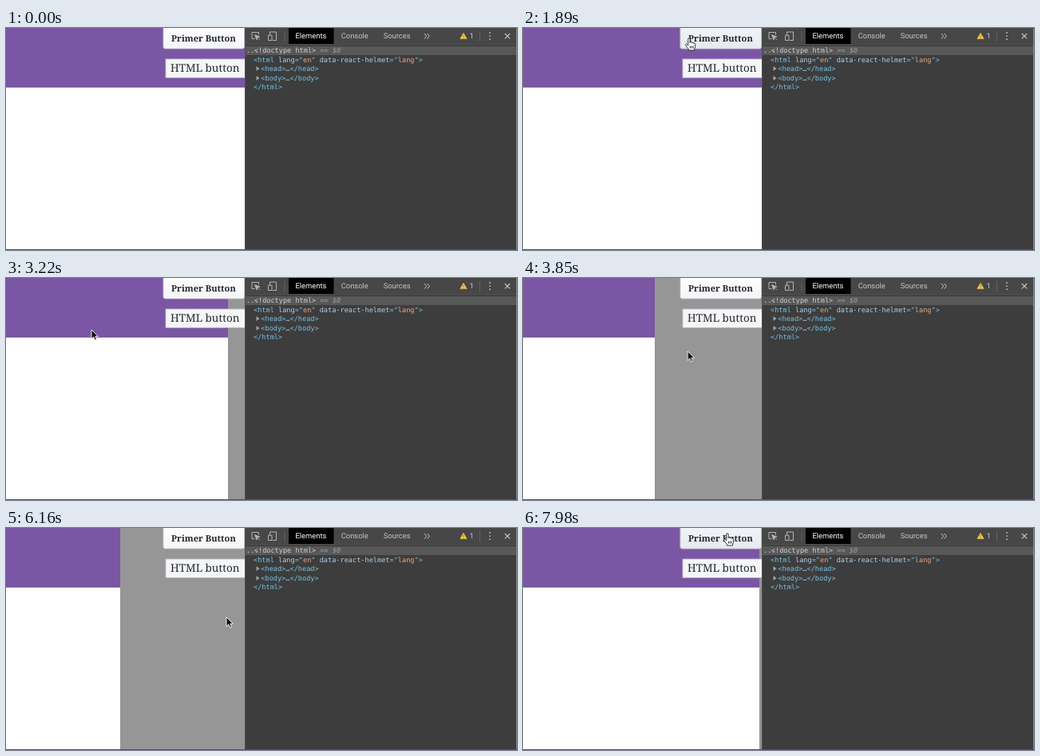
These frames come from a looping animation (640 by 279 pixels, 8 s). An HTML page:

```html
<!DOCTYPE html>
<html lang="en">
<head>
<meta charset="utf-8">
<title>Page and inspector</title>
<style>
  html, body { margin: 0; width: 100%; height: 100%; overflow: hidden; background: #fff; }
  svg { display: block; width: 100vw; height: 100vh; }
  text { white-space: pre; text-rendering: geometricPrecision; }

  .serif { font-family: "Noto Serif", serif; fill: #24292e; }
  .tabs { font: 9.4px Roboto, sans-serif; fill: #c4c4c4; }
  .tabs .active { fill: #fff; }
  .code { font: 8.59px "DejaVu Sans Mono", monospace; fill: #74c3e8; }
  .attr { fill: #b0d0ea; }
  .value { fill: #f0a880; }
  .muted { fill: #d0d0d0; }
  .faint { fill: #a0a0a0; }
  .icon { fill: none; stroke: #b4b4b4; stroke-width: 1; }

  .page, .cursor, .arrow, .hand, .hover { animation: 8s linear infinite; }
  .page { animation-name: slide; }
  .cursor { animation-name: travel; }
  .arrow { animation-name: arrow; }
  .hand, .hover { animation-name: over; }
  .arrow, .hand, .hover { animation-timing-function: step-end; }

  @keyframes slide {
    0%, 38.65% { transform: translateX(0); animation-timing-function: cubic-bezier(.33, .33, .6, 1); }
    52.5% { transform: translateX(-156px); }
    86% { transform: translateX(-156px); animation-timing-function: cubic-bezier(.33, .33, .6, 1); }
    100% { transform: translateX(-2.8px); }
  }
  @keyframes travel {
    0%, 4% { transform: translate(-14px, 205px); animation-timing-function: ease-in-out; }
    13% { transform: translate(208px, 13px); }
    32% { transform: translate(208px, 13px); animation-timing-function: ease-in-out; }
    39% { transform: translate(107px, 65px); }
    42% { transform: translate(107px, 65px); animation-timing-function: ease-in-out; }
    55.5% { transform: translate(342px, 129px); }
    73.4% { transform: translate(342px, 129px); animation-timing-function: ease-in-out; }
    77% { transform: translate(276px, 112px); }
    78.8% { transform: translate(276px, 112px); animation-timing-function: ease-in-out; }
    84%, 100% { transform: translate(256px, 7px); }
  }
  @keyframes over {
    0% { opacity: 0; }
    12.2% { opacity: 1; }
    33.2% { opacity: 0; }
    83%, 100% { opacity: 1; }
  }
  @keyframes arrow {
    0% { opacity: 1; }
    12.2% { opacity: 0; }
    33.2% { opacity: 1; }
    83%, 100% { opacity: 0; }
  }
</style>
</head>
<body>
<svg viewBox="0 0 640 279" preserveAspectRatio="none">
  <defs>
    <linearGradient id="face" x2="0" y2="1">
      <stop stop-color="#fefefe"/><stop offset="1" stop-color="#f4f5f8"/>
    </linearGradient>
    <linearGradient id="faceHover" x2="0" y2="1">
      <stop stop-color="#f2f4f7"/><stop offset="1" stop-color="#e6eaf0"/>
    </linearGradient>
  </defs>

  <rect width="300" height="279" fill="#969696"/>
  <g class="page">
    <rect width="299" height="279" fill="#fff"/>
    <rect width="299" height="74.5" fill="#7a56a5"/>
    <rect y="73.5" width="299" height="1" fill="#6d4b98"/>
  </g>

  <g class="serif">
    <rect x="197" y="-3" width="101.5" height="29" rx="2.5" fill="url(#face)" stroke="#c5c3cf" stroke-width=".8"/>
    <rect class="hover" x="197" y="-3" width="101.5" height="29" rx="2.5" fill="url(#faceHover)" stroke="#b5b3c2" stroke-width=".8"/>
    <text x="207" y="17.2" font-size="11.1" font-weight="700">Primer Button</text>
    <rect x="200" y="39" width="102" height="23.4" fill="#f5f6f7" stroke="#bcbcc4" stroke-width=".9"/>
    <text x="206" y="55.2" font-size="13.5">HTML button</text>
  </g>

  <!-- Inspector -->
  <rect x="299" width="341" height="279" fill="#3d3d3d"/>
  <rect x="299" width="341" height="21" fill="#474747"/>
  <rect x="299" y="20.5" width="341" height="1" fill="#525252"/>
  <rect x="299" y="23" width="341" height="11" fill="#585858"/>
  <rect x="299" width="1" height="279" fill="#505050"/>

  <g class="icon">
    <path d="M311.5 13.5H308V5.5H316.5V8.5"/>
    <path d="M311.5 8.5L318 11L315 12L314 15ZM315 12L318 15" fill="#b4b4b4" stroke-width=".8"/>
    <path d="M330.5 9V5H338.5V15.5H334M328.5 9.2H333V15.5H328.5Z"/>
    <path d="M349 4V17M593.5 4V17" stroke="#626262"/>
    <path d="M524 7L526.7 10.3L524 13.6M527.6 7L530.3 10.3L527.6 13.6" stroke="#c4c4c4"/>
    <path d="M624.8 7L631.2 13.4M631.2 7L624.8 13.4" stroke="#c4c4c4" stroke-width="1.1"/>
    <path d="M606 6V14.6" stroke="#c4c4c4" stroke-width="1.8" stroke-linecap="round" stroke-dasharray="0 4.1"/>
  </g>
  <rect x="354" width="56.5" height="20" fill="#000"/>
  <g class="tabs">
    <text x="362.5" y="13.3" class="active">Elements</text>
    <text x="419.7" y="13.3">Console</text>
    <text x="472.7" y="13.3">Sources</text>
    <path d="M573 6.2L577.2 13.6H568.8Z" fill="#f3c94a" stroke="#f3c94a" stroke-width=".5" stroke-linejoin="round"/>
    <path d="M573 8.6V11.2M573 12V12.8" stroke="#7a6018" stroke-width=".8"/>
    <text x="580.6" y="13.3">1</text>
  </g>

  <g class="code">
    <text x="301" y="30.9" class="muted" font-size="8.59">...</text>
    <text x="310.8" y="30.9" class="muted">&lt;!doctype html&gt;<tspan class="faint"> == <tspan font-style="italic">$0</tspan></tspan></text>
    <text x="310" y="42.7">&lt;html <tspan class="attr">lang</tspan>="<tspan class="value">en</tspan>" <tspan class="attr">data-react-helmet</tspan>="<tspan class="value">lang</tspan>"&gt;</text>
    <path d="M313.5 48L317.6 51L313.5 54ZM313.5 60L317.6 63L313.5 66Z" fill="#a0a0a0"/>
    <text x="319.3" y="54.2">&lt;head&gt;<tspan class="muted">…</tspan>&lt;/head&gt;</text>
    <text x="319.3" y="65.8">&lt;body&gt;<tspan class="muted">…</tspan>&lt;/body&gt;</text>
    <text x="310" y="77.3">&lt;/html&gt;</text>
  </g>

  <rect x="639" width="1" height="279" fill="#8a8a8a"/>
  <rect y="278" width="640" height="1" fill="#0a860a"/>

  <g class="cursor">
    <path class="arrow" d="M0 0V11.6L2.7 9.1L4.5 13.2L6.5 12.3L4.8 8.4H8.4Z" fill="#111" stroke="#fff" stroke-width=".9" stroke-linejoin="round"/>
    <path class="hand" d="M-1.2 9V1.1Q-1.2 -.3 0 -.3T1.2 1.1V5.6Q1.4 4.5 2.5 4.6T3.6 6Q3.9 5 4.9 5.2T5.8 6.6Q6.2 5.8 7 6.1T7.7 7.6V10.2Q7.5 12 6.6 13.2V15H-.6V13.4Q-2.6 11.6 -4.3 8.4Q-4.6 7.3 -3.7 7T-2.2 7.8Z M1.4 9.5V12.6M3.3 9.5V12.6M5.2 9.5V12.6" fill="#fff" stroke="#222" stroke-width=".9" stroke-linejoin="round"/>
  </g>
</svg>
</body>
</html>
```
